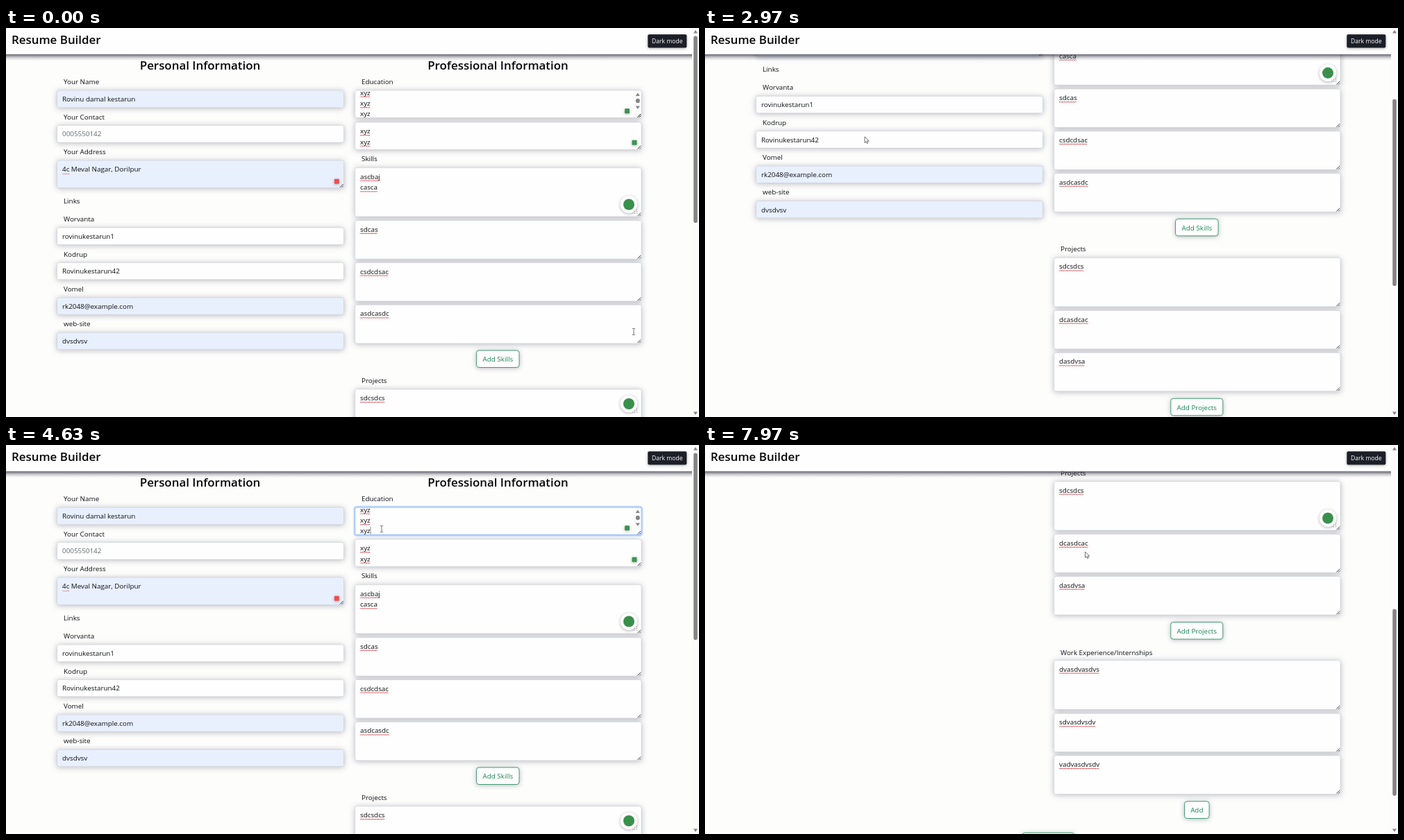
Animation, 998 px wide and 561 px high, one loop 8000 ms. Source, as an HTML page:

```html
<!DOCTYPE html>
<html lang="en">
<head>
<meta charset="utf-8">
<title>Resume Builder</title>
<style>
html, body { margin: 0; width: 100%; height: 100%; overflow: hidden; background: #fdfdfc; }
svg { display: block; width: 100vw; height: 100vh; }
text { font: 9.85px "Open Sans", "Noto Sans", sans-serif; fill: #0e1013; white-space: pre; }
.head { font-size: 16.9px; font-weight: 600; fill: #050507; }
.mid { text-anchor: middle; }
.box { fill: #fefefe; stroke: #ced4da; stroke-width: .7; filter: drop-shadow(0 1px 4px rgba(66, 66, 88, .36)); }
.auto { fill: #e8f0fe; }
.hint { fill: #63686e; }
.btn { fill: #fefefe; stroke: #198754; stroke-width: .8; filter: drop-shadow(0 1px 3.5px rgba(66, 66, 88, .36)); }
.btntext { fill: #198754; }
.wave { fill: none; stroke: #d8343c; stroke-width: .9; }
.grip { stroke: #222; stroke-width: .9; }
.gray { fill: #858585; }
.badge { filter: drop-shadow(0 1px 2px rgba(0, 0, 0, .3)); }
</style>
</head>
<body>
<svg id="stage" viewBox="0 0 998 561" preserveAspectRatio="none"></svg>
<script>
const LOOP = 8000;
const stage = document.getElementById('stage');

function add(parent, tag, attrs = {}, content) {
  const el = document.createElementNS('http://www.w3.org/2000/svg', tag);
  for (const key in attrs) el.setAttribute(key, attrs[key]);
  if (content !== undefined) el.textContent = content;
  parent.appendChild(el);
  return el;
}
const rect = (p, x, y, width, height, attrs) => add(p, 'rect', { x, y, width, height, ...attrs });
const label = (p, x, y, str, cls = '') => add(p, 'text', { x, y, class: cls }, str);
const path = (p, d, attrs) => add(p, 'path', { d, ...attrs });

function wavePath(x, y, width) {
  let d = `M${x} ${y}`;
  for (let i = 1; i * 1.3 <= width; i++) d += `L${(x + i * 1.3).toFixed(1)} ${y + (i % 2 ? 1.3 : 0)}`;
  return d;
}

function misspelt(p, x, y, str) {
  const text = label(p, x, y, str);
  const wave = path(p, wavePath(x, y + 2, text.getComputedTextLength()), { class: 'wave' });
  return { text, wave };
}

const grip = (p, x, y) =>
  path(p, `M${x - 5.5} ${y - .8}l4.7 -4.7M${x - 2.8} ${y - .8}l2 -2`, { class: 'grip' });

function input(y, height, str, cls = '', textCls = '') {
  rect(page, 73.5, y, 413, height, { rx: 2.5, class: 'box ' + cls });
  label(page, 81, y + 16, str, textCls);
}

function area(y, height, ...lines) {
  const box = rect(page, 502.7, y, 412.3, height, { rx: 2.5, class: 'box' });
  lines.forEach((str, i) => misspelt(page, 510, y + 16 + i * 15.6, str));
  grip(page, 915, y + height);
  return box;
}

function button(cx, y, width, str) {
  rect(page, cx - width / 2, y, width, 24.5, { rx: 3.5, class: 'btn' });
  label(page, cx, y + 16.3, str, 'btntext mid');
}

function badge() {
  const g = add(page, 'g');
  add(g, 'circle', { r: 12.3, fill: '#fefefe', class: 'badge' });
  add(g, 'circle', { r: 8, fill: '#3a8f4b' });
  for (const [x, y] of [[11, 7], [8, 9.5], [11, 9.5], [5.5, 12], [8, 12], [11, 12]])
    rect(g, x, y, 1, 1, { class: 'gray' });
  return g;
}

const chip = (x, y, fill) => rect(page, x, y, 7, 7, { rx: 1, fill, class: 'badge' });
const show = (el, on) => el.setAttribute('visibility', on ? 'visible' : 'hidden');
const place = (el, x, y) => el.setAttribute('transform', `translate(${x} ${y})`);

rect(stage, 0, 0, 998, 561, { fill: '#fdfdfc' });
const page = add(stage, 'g');

// Left column
label(page, 279.5, 60, 'Personal Information', 'head mid');
[['Your Name', 81], ['Your Contact', 131.5], ['Your Address', 181.7], ['Links', 253],
 ['Worvanta', 279], ['Kodrup', 329.5], ['Vomel', 379.8], ['web-site', 430]]
  .forEach(([str, y]) => label(page, 83, y, str));
input(90, 24.7, 'Rovinu damal kestarun', 'auto');
input(140.4, 24.7, '0005550142', '', 'hint');
input(191, 39.5, '4c Meval Nagar, Dorilpur', 'auto');
path(page, wavePath(81, 209.8, 11), { class: 'wave', opacity: .6 });
chip(472.8, 217.8, '#ee4f4f');
grip(page, 486.5, 230.5);
input(288, 24.4, 'rovinukestarun1');
input(338.4, 24.4, 'Rovinukestarun42');
input(388.8, 24.4, 'rk2048@example.com', 'auto');
input(439.2, 24.4, 'dvsdvsv', 'auto');

// Right column
label(page, 708.5, 60, 'Professional Information', 'head mid');
[['Education', 81], ['Skills', 192], ['Projects', 512], ['Work Experience/Internships', 771]]
  .forEach(([str, y]) => label(page, 512, y, str));
const ring = rect(page, 501.6, 88.9, 414.6, 41.7,
  { rx: 3.6, fill: 'none', stroke: '#0d6efd', 'stroke-opacity': .25, 'stroke-width': 2.4 });
const eduBox = area(90, 39.5);
const edge = rect(page, 502.7, 90, 412.3, 39.5,
  { rx: 2.5, fill: '#fefefe', stroke: '#86b7fe', 'stroke-width': .9 });
const clip = add(add(stage, 'defs'), 'clipPath', { id: 'edu' });
rect(clip, 503, 90.5, 411, 38.6);
const edu = add(page, 'g', { 'clip-path': 'url(#edu)' });
misspelt(edu, 510, 96.5, 'xyz');
misspelt(edu, 510, 112.1, 'xyz');
const typed = misspelt(edu, 510, 127.2, 'xyz');
const caret = rect(edu, 0, 117.5, .6, 11.5, { fill: '#555' });
rect(page, 905.5, 91, 8.8, 31, { fill: '#fafafa' });
path(page, 'M906.8 98l3 -4.5 3 4.5zM906.8 112.5l3 4.5 3 -4.5z', { class: 'gray' });
rect(page, 906.9, 101.7, 5.9, 6.4, { rx: 2.9, class: 'gray' });
grip(page, 915, 129.5);
chip(891, 116.3, '#3f9350');

area(136, 39.3, 'xyz', 'xyz');
const lateChip = chip(901.5, 161.8, '#3f9350');
area(201.6, 70.4, 'ascbaj', 'casca');
place(badge(), 897, 254.5);
['sdcas', 'csdcdsac', 'asdcasdc'].forEach((str, i) => area(277.7 + i * 60.8, 55.6, str));
button(708.3, 465, 61.5, 'Add Skills');
area(521, 70.6, 'sdcsdcs');
area(597.2, 55.5, 'dcasdcac');
area(658, 55.5, 'dasdvsa');
const lowBadge = badge();
button(708.3, 724, 75, 'Add Projects');
area(779, 71, 'dvasdvasdvs');
area(855.7, 55.6, 'sdvasdvsdv');
area(916.4, 55.6, 'vadvasdvsdv');
button(708.3, 982.5, 35.5, 'Add');
button(494.5, 1027.8, 75, '');

// Header and scrollbar
const shade = add(add(stage, 'defs'), 'linearGradient', { id: 'shade', x2: 0, y2: 1 });
[[0, .76], [.25, .52], [.6, .18], [1, 0]].forEach(([offset, o]) =>
  add(shade, 'stop', { offset, 'stop-color': '#303040', 'stop-opacity': o }));
rect(stage, 0, 37.5, 988, 9.5, { fill: 'url(#shade)' });
rect(stage, 0, 0, 988, 37.7, { fill: '#fefefe' });
label(stage, 8, 23.2, 'Resume Builder', 'head');
rect(stage, 924.3, 9.3, 56, 19.2, { rx: 2, fill: '#1c1f28', class: 'badge' });
label(stage, 952.3, 22.3, 'Dark mode', 'mid').setAttribute('style', 'font-size:8.6px;fill:#fff');
rect(stage, 988, 0, 10, 561, { fill: '#fbfbfb' });
path(stage, 'M990 7.5l3 -4.5 3 4.5zM990 553.5l3 4.5 3 -4.5z', { class: 'gray' });
const thumb = rect(stage, 990.2, 11.5, 5.6, 269.5, { rx: 2.8, class: 'gray' });

// Pointers, both placed by their hot spot
const beam = path(stage, 'M-2 -4.5h1.5l.5 .5 .5 -.5h1.5M0 -4v8M-2 4.5h1.5l.5 -.5 .5 .5h1.5',
  { fill: 'none', stroke: '#444', 'stroke-width': .75 });
const arrow = path(stage, 'M0 0v8.6l2 -1.9 1.3 3 1.5 -.7 -1.3 -2.8h2.7z',
  { fill: '#fff', stroke: '#333', 'stroke-width': .7 });

// Keys are [time, value, ...], eased within every segment
function track(keys, t) {
  let i = 0;
  while (i < keys.length - 2 && t >= keys[i + 1][0]) i++;
  const [a, b] = [keys[i], keys[i + 1]];
  const k = Math.min(1, Math.max(0, (t - a[0]) / (b[0] - a[0])));
  const e = k * k * (3 - 2 * k);
  return a.slice(1).map((v, n) => v + (b[n + 1] - v) * e);
}

const scrollKeys = [[2600, 0], [2980, 190], [3380, 0], [3460, -9.8], [3560, -9.8], [3900, 0]];
const pointerKeys = [[30, 904, 438], [830, 385, 170], [1650, 240, 135], [2500, 230, 157],
  [3650, 230, 156.5], [4350, 541, 121], [6150, 541, 121], [6750, 547.5, 154]];
const SCROLL_AT = 6965, SPEED = .4657;
const FOCUS_AT = 4420, TYPE_AT = 5120, KEY_GAP = 110, WORD = 'dvsvsvs';

let lastCount = -1;
function draw(t) {
  const s = t < SCROLL_AT ? track(scrollKeys, t)[0] : (t - SCROLL_AT) * SPEED;
  place(page, 0, -s);
  thumb.setAttribute('y', 11.5 + Math.max(0, s) * .48);
  place(lowBadge, 897, Math.min(574, 542 + s));
  const settled = t < 2600 || t > 3950;
  show(lateChip, settled);
  show(lowBadge, settled);

  const focus = Math.min(1, Math.max(0, (t - FOCUS_AT) / 150));
  ring.setAttribute('opacity', focus);
  edge.setAttribute('opacity', focus);
  eduBox.setAttribute('opacity', 1 - focus);

  const count = Math.min(WORD.length, Math.max(0, Math.floor((t - TYPE_AT) / KEY_GAP) + 1));
  if (count !== lastCount) {
    lastCount = count;
    typed.text.textContent = 'xyz' + WORD.slice(0, count);
    const width = typed.text.getComputedTextLength();
    typed.wave.setAttribute('d', wavePath(510, 129.2, width));
    caret.setAttribute('x', 510 + width);
  }
  const since = count ? t - TYPE_AT - (count - 1) * KEY_GAP : t - FOCUS_AT;
  show(caret, t >= FOCUS_AT && since % 1060 < 530);

  const [x, y] = track(pointerKeys, t);
  const overText = !(t > 2750 && t < 4150) && t < 7600 && !(t > 300 && t < 800);
  place(beam, x, y);
  place(arrow, x, y);
  show(beam, overText);
  show(arrow, !overText);
}

function tick() {
  draw(performance.now() % LOOP);
  requestAnimationFrame(tick);
}
tick();
</script>
</body>
</html>
```
